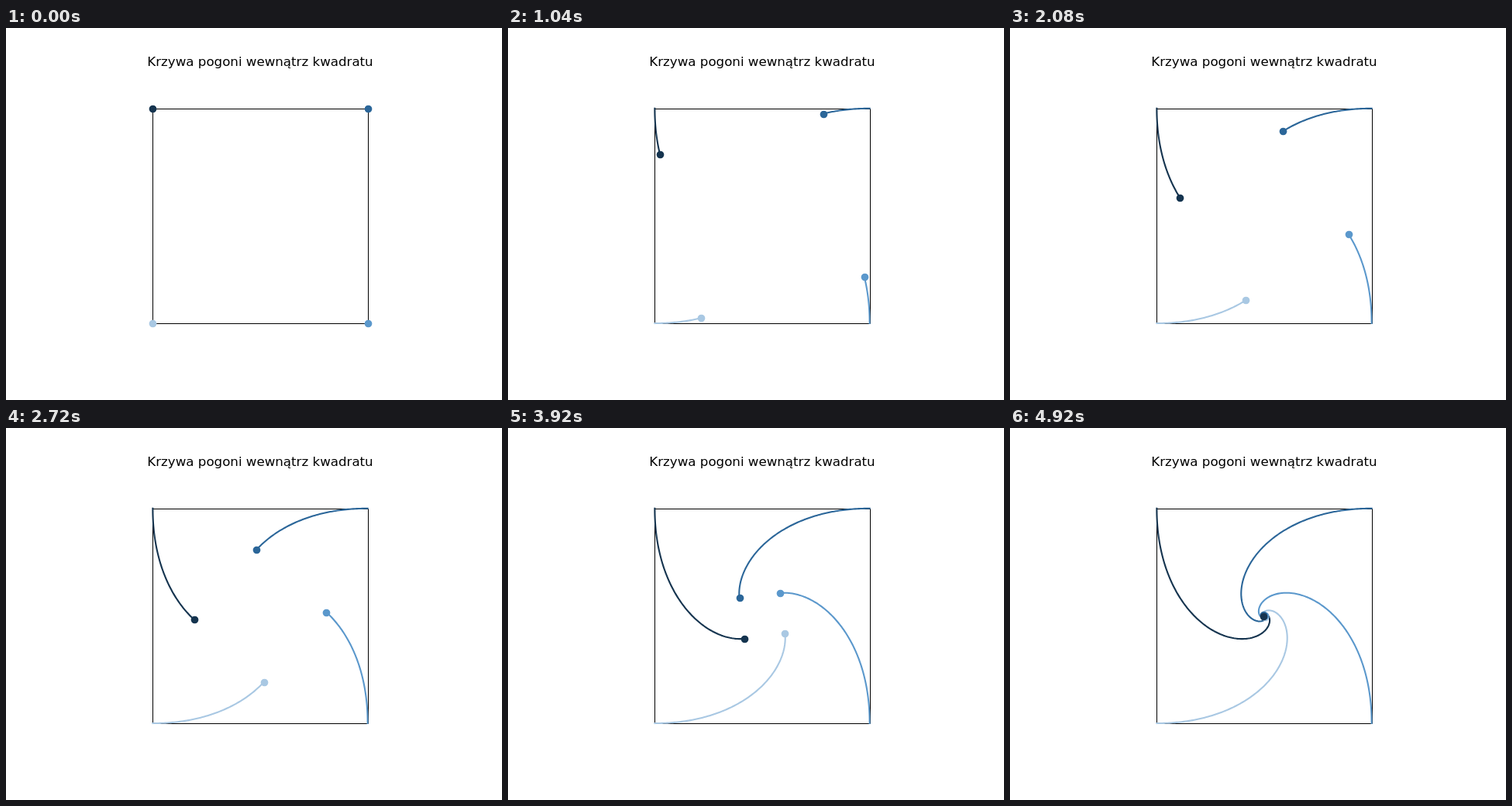
An HTML page with a canvas for the animation above (4960 ms loop, 640 px wide and 480 px high).

```html
<!DOCTYPE html>
<html lang="pl">
<head>
<meta charset="utf-8">
<title>Krzywa pogoni</title>
<style>
html, body { margin: 0; overflow: hidden; background: #fff; }
canvas { display: block; }
</style>
</head>
<body>
<canvas id="stage" width="640" height="480"></canvas>
<script>
const ctx = document.getElementById('stage').getContext('2d');
const FRAME_MS = 40, FRAMES = 124;
const COLORS = ['#a9c8e3', '#5b98cc', '#2b6699', '#15344f'];
const SIDE = 277.2, LEFT = 189.4, TOP = 103.8;
const STEP = SIDE / 120;
const RIGHT = LEFT + SIDE, BOTTOM = TOP + SIDE;

// Each point takes a fixed-length step towards its neighbour.
const history = [[[LEFT, BOTTOM], [RIGHT, BOTTOM], [RIGHT, TOP], [LEFT, TOP]]];
while (history.length < FRAMES) {
  const points = history[history.length - 1];
  history.push(points.map(([x, y], i) => {
    const [tx, ty] = points[(i + 1) % 4];
    const k = STEP / Math.hypot(tx - x, ty - y);
    return [x + (tx - x) * k, y + (ty - y) * k];
  }));
}

const snap = v => Math.round(v) + 0.5;

function drawTrail(i, frame) {
  ctx.strokeStyle = COLORS[i];
  ctx.beginPath();
  for (let n = 0; n <= frame; n++) ctx.lineTo(...history[n][i]);
  ctx.stroke();
}

function drawDot(i, frame) {
  const [x, y] = history[frame][i];
  ctx.fillStyle = COLORS[i];
  ctx.beginPath();
  ctx.arc(snap(x), snap(y), 4.86, 0, 2 * Math.PI);
  ctx.fill();
}

function draw(frame) {
  ctx.fillStyle = '#fff';
  ctx.fillRect(0, 0, 640, 480);

  ctx.fillStyle = '#000';
  ctx.font = '16.667px "DejaVu Sans", sans-serif';
  ctx.textAlign = 'center';
  ctx.fillText('Krzywa pogoni wewnątrz kwadratu', 328, 49);

  ctx.strokeStyle = '#000';
  ctx.lineWidth = 1;
  ctx.lineCap = 'butt';
  ctx.strokeRect(snap(LEFT), snap(TOP), snap(RIGHT) - snap(LEFT), snap(BOTTOM) - snap(TOP));

  ctx.lineWidth = 2.083;
  ctx.lineCap = 'square';
  ctx.lineJoin = 'round';
  if (frame) COLORS.forEach((_, i) => drawTrail(i, frame));
  COLORS.forEach((_, i) => drawDot(i, frame));
}

const start = performance.now();
function tick() {
  draw(Math.floor((performance.now() - start) / FRAME_MS) % FRAMES);
  requestAnimationFrame(tick);
}
tick();
</script>
</body>
</html>
```
